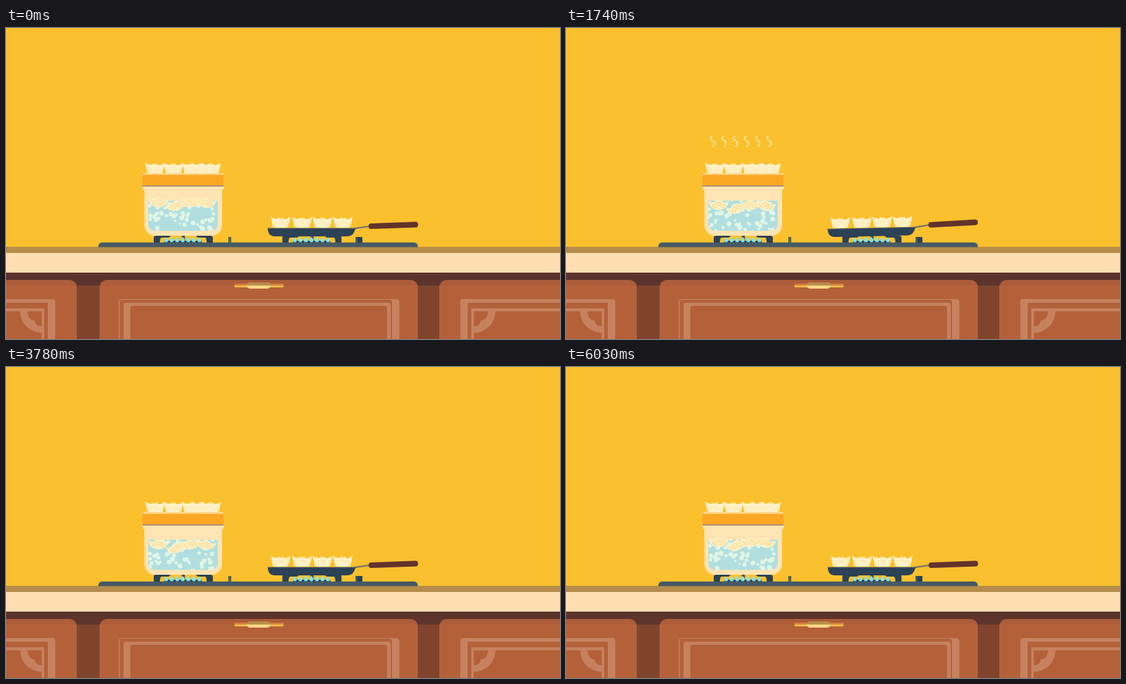
These frames come from a looping animation (900 by 506 pixels, 6060 ms). An HTML page with a canvas:

```html
<!DOCTYPE html>
<html lang="en">
<head>
<meta charset="utf-8">
<title>Dumplings on the stove</title>
<style>
  html, body { margin: 0; width: 100%; height: 100%; overflow: hidden; background: #fbc02d; }
  canvas { display: block; }
</style>
</head>
<body>
<canvas id="stage" width="900" height="506"></canvas>
<script>
const ctx = document.getElementById('stage').getContext('2d');
const LOOP = 6060, TAU = Math.PI * 2;
const navy = '#2b4155', wood = '#b46139', trim = '#c6825e', cream = '#ffe4b3';

const rect = (x, y, w, h, color, radius = 0) => {
  ctx.fillStyle = color;
  ctx.beginPath();
  ctx.roundRect(x, y, w, h, radius);
  ctx.fill();
};
const shape = (path, color) => { ctx.fillStyle = color; ctx.fill(new Path2D(path)); };
const line = (path, color, width) => {
  ctx.strokeStyle = color;
  ctx.lineWidth = width;
  ctx.stroke(new Path2D(path));
};
const at = (x, y, angle, draw) => {
  ctx.save();
  ctx.translate(x, y);
  ctx.rotate(angle);
  draw();
  ctx.restore();
};
// Smooth 0-1-0 hump between two times
const hump = (t, from, to) => t > from && t < to ? Math.sin(Math.PI * (t - from) / (to - from)) ** 2 : 0;
const clamp = v => Math.max(0, Math.min(1, v));

let seed = 11;
const random = () => (seed = seed * 16807 % 2147483647) / 2147483647;
const bubbles = Array.from({ length: 62 }, () => ({
  x: 233 + random() * 109, phase: random(), turns: 5 + Math.floor(random() * 4),
  r: 1.7 + random() * 2.2, sway: random() * TAU
}));

function dumpling(x, y, angle = 0) {
  at(x, y, angle, () => {
    shape('M-16 0Q-10 5-4 3L-2 1 0 4 3 1 5 4Q11 5 16 0Q15 8 12 17Q0 19-12 17Q-14 8-16 0Z', '#fff3cd');
    line('M-12 6Q-9 12-10 16M-6 15Q-9 8-2 7Q6 6 7 15M-2 15Q-3 11 1 10Q4 11 3 15M12 6Q9 11 10 16', '#ffe3a0', 1.1);
  });
}

function sideDoor(x, dir) {
  at(x, 0, 0, () => {
    ctx.scale(dir, 1);
    rect(0, 441, 180, 80, trim, [4, 0, 0, 0]);
    rect(12, 447, 170, 80, wood);
    rect(18, 456, 165, 80, trim);
    rect(22, 461, 160, 80, wood);
    shape('M22 461H57A35 35 0 0 1 22 496V485Q33 485 33 476Q44 476 45 461Z', trim);
    shape('M22 461H45Q44 471 34 471Q33 485 22 485Z', wood);
  });
}

function cabinets() {
  rect(0, 398, 900, 108, '#80442d');
  rect(0, 398, 900, 21, '#5d342b');
  for (const [x, w] of [[-40, 155], [152, 517], [704, 240]]) {
    rect(x, 410, w, 120, '#ad5d39', 12);
    rect(x, 419, w, 100, wood);
  }
  sideDoor(80, -1);
  sideDoor(738, 1);
  rect(183, 441, 456, 80, trim, 5);
  rect(184.5, 442, 442.5, 80, wood, 4);
  rect(191, 447, 434, 80, trim, 4);
  rect(202, 452, 417, 80, wood, 4);
  rect(371, 416, 80, 6, '#f6bd48', 2);
  rect(371, 416, 80, 3, '#d9823c', [2, 2, 0, 0]);
  shape('M391 419H430V421L426 424H395L391 421Z', '#ffd685');
  shape('M391 419V416L395 414H426L430 416V419Z', '#b98f4a');
}

function burner(x, glow) {
  shape(`M${x} 349V341Q${x} 338 ${x + 4} 338H${x + 28}L${x + 24} 341H${x + 13}Q${x + 10} 341 ${x + 10} 349Z`, navy);
  shape(`M${x + 96} 349V341Q${x + 96} 338 ${x + 92} 338H${x + 68}L${x + 72} 341H${x + 83}Q${x + 86} 341 ${x + 86} 349Z`, navy);
  rect(x + 17, 346, 61, 3, navy, 1);
  rect(x + 45.5, 338, 5, 11, navy);
  for (let i = 0; i < 7; i++) {
    const fx = x + 20 + i * 9;
    const top = 339.5 + Math.abs(i - 3) * .4;
    shape(`M${fx} ${top}Q${fx + 6} 346 ${fx + 1.5} 348.5H${fx - 1.5}Q${fx - 5} 346 ${fx} ${top}Z`,
      `rgb(${165 - 35 * glow},${212 + 16 * glow},${190 + 45 * glow})`);
  }
}

function pot(t) {
  rect(225, 260, 126, 78, cream, [0, 0, 17, 17]);
  rect(222, 258, 132, 6, cream, [0, 0, 4, 4]);
  rect(231, 281, 113, 49, '#b1dfdf', [0, 0, 11, 11]);
  ctx.save();
  ctx.beginPath();
  ctx.roundRect(231, 281, 113, 49, [0, 0, 11, 11]);
  ctx.clip();
  ctx.fillStyle = '#e1f5e6';
  for (const b of bubbles) {
    const rise = (b.phase + t / LOOP * b.turns) % 1;
    ctx.beginPath();
    ctx.arc(b.x + 2 * Math.sin(rise * 7 + b.sway), 333 - rise * 56, b.r, 0, TAU);
    ctx.fill();
  }
  ctx.restore();
  const floaters = [[248, 275, .08], [274, 281, -.3], [299, 275, -.05], [326, 276, .16]];
  floaters.forEach(([x, y, tilt], i) => {
    const bob = 3.2 * (1 - Math.cos(TAU * t / 1032));
    at(x, y + bob, tilt + .06 * Math.sin(TAU * t / 1032 + i), () => {
      shape('M-16 2Q-9 7-5 2Q0-1 5 2Q9 7 16 2Q16 15 0 17Q-16 15-16 2Z', '#fff0c6');
      line('M-11 7Q-9 12-5 13M-7 9Q-3 3 0 5Q6 4 8 9M-3 13Q-2 8 2 8Q5 9 4 13M11 7Q10 12 7 13', '#fbd98c', 1.3);
    });
  });
}

function steam(t, start) {
  const p = (t - start) / 570;
  if (p <= 0 || p >= 1) return;
  ctx.globalAlpha = clamp(p * 5) * clamp((1 - p) * 5);
  const y = 172 + 38 * (1 - p) ** 1.6;
  for (let i = 0; i < 6; i++) {
    const x = 236 + i * 18.3;
    line(`M${x + 1} ${y}q-4 3 1 6.5q7 4 1 9.5`, '#ffe9a8', 2);
  }
  ctx.globalAlpha = 1;
}

function steamer(t) {
  const tilt = .165 * hump(t, 435, 855) - .09 * hump(t, 855, 1200);
  const pivot = tilt > 0 ? 332 : 243;
  at(pivot, 258, tilt, () => {
    ctx.translate(-pivot, -258);
    for (const x of [272, 317, 302, 242, 333]) dumpling(x, 219);
    rect(222, 236, 131, 4, '#ffd68a');
    rect(222, 239, 131, 17, '#fba724');
    rect(222, 256, 131, 2, '#a58b78');
  });
}

function pan(t) {
  const rock = -.021 * Math.sin(TAU * (t - 1590) / 600) * (t > 1590 && t < 2490 ? 1 : 0);
  at(482, 338, rock, () => {
    ctx.translate(-482, -338);
    for (const x of [446, 481, 514, 547]) dumpling(x, 307);
    line('M562 328L570 325.5 592 322.5', '#77746a', 2.5);
    shape('M425 326H568L566 331Q563 339 554 339H437Q428 339 426 331Z', navy);
    rect(425, 325.5, 143, 1.5, '#3d5366');
    shape('M593 318L665 315.3Q669.5 315.5 669.5 320T665 324.5L593 327Q589 327 589 322.5T593 318Z', '#61342b');
  });
}

function draw(t) {
  rect(0, 0, 900, 506, '#fbc02d');
  rect(0, 356, 900, 10, '#b58c49');
  rect(0, 366, 900, 32, '#ffdfb2');
  cabinets();
  rect(150, 349, 519, 7.5, '#455a64', [6, 6, 0, 0]);
  rect(361, 340, 5, 9, '#5d6554');
  rect(568, 340, 11, 9, navy);
  rect(569, 341, 2, 8, '#4b5d65');
  const glow = clamp(.85 - .85 * Math.cos(TAU * (t - 540) / 880));
  burner(240, glow);
  burner(449, glow);
  pot(t);
  steam(t, 1320);
  steam(t, 5310);
  steamer(t);
  pan(t);
}

ctx.lineCap = ctx.lineJoin = 'round';
const begin = performance.now();
function frame() {
  draw((performance.now() - begin) % LOOP);
  requestAnimationFrame(frame);
}
frame();
</script>
</body>
</html>
```
